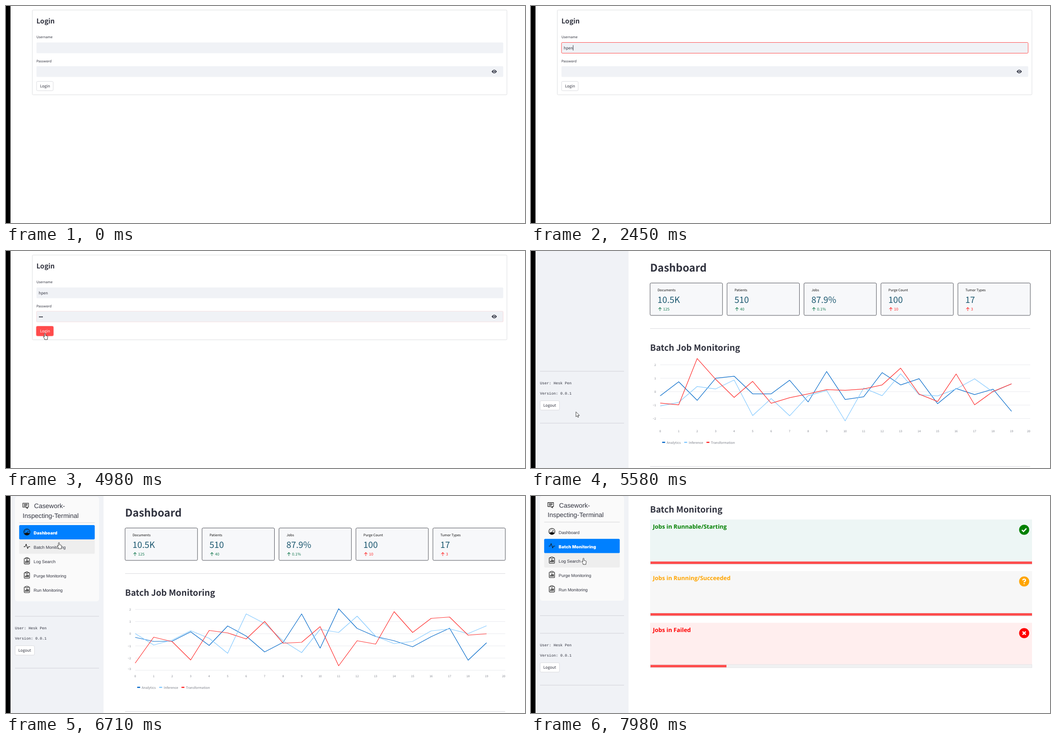
Recreate the animation shown at these times as an HTML page. Size 1155x485 px, loop 8 s.

```html
<!DOCTYPE html>
<html lang="en">
<head>
<meta charset="utf-8">
<title>Monitoring demo</title>
<style>
html, body { margin: 0; width: 100%; height: 100%; overflow: hidden; background: #fff; }
svg { display: block; width: 1155px; height: 485px; text-rendering: geometricPrecision; }
text { fill: #31333f; white-space: pre; font-family: "Noto Sans CJK JP", "Noto Sans CJK SC", "Noto Sans CJK", "Noto Sans", sans-serif; }
.b { font-weight: 700; }
.arial { font-family: "Liberation Sans", Arial, sans-serif; }
.black { font-family: Inter, "Liberation Sans", sans-serif; font-weight: 900; }
.mono { font-family: "Liberation Mono", monospace; }
.open { font-family: "Open Sans", "Noto Sans", sans-serif; font-weight: 700; }
.icon { fill: none; stroke: #111; stroke-width: 1.1; }
</style>
</head>
<body>
<svg id="stage" viewBox="0 0 1155 485"></svg>
<script>
const LOOP = 8000;
const USER = "hpen", FULL_NAME = "Hesk Pen";
const TITLE = ["Casework-", "Inspecting-Terminal"];
const BLUE = "#0068c9", SKY = "#83c9ff", RED = "#ff2b2b", CORAL = "#ff4b4b", GREEN = "#177a52";

const clamp = v => Math.max(0, Math.min(1, v));
const ramp = (t, a, b) => clamp((t - a) / (b - a));
const between = (t, a, b) => t >= a && t < b;

const text = (x, y, s, size, attrs = "") => `<text x="${x}" y="${y}" font-size="${size}" ${attrs}>${s}</text>`;
const rect = (x, y, w, h, fill, attrs = "") => `<rect x="${x}" y="${y}" width="${w}" height="${h}" fill="${fill}" ${attrs}/>`;
const line = (x1, x2, y, color, width = 1) => `<path d="M${x1} ${y}H${x2}" stroke="${color}" stroke-width="${width}"/>`;
const path = (d, attrs) => `<path d="${d}" ${attrs}/>`;
const at = (x, y, s, attrs = "") => `<g transform="translate(${x} ${y})" ${attrs}>${s}</g>`;

// Mouse: time, x, y
const TRACK = [
  [170, 797, 335], [560, 420, 62], [700, 260, 36], [920, 170, 95],
  [2980, 170, 95], [3450, 179, 141], [4510, 179, 141], [4850, 88, 191],
  [5080, 88, 191], [5310, 100, 358], [5580, 100, 360], [6040, 121, 133],
  [6300, 121, 133], [6600, 119, 111], [7250, 119, 111], [7450, 119, 120],
  [7710, 119, 120], [7980, 118, 146]
];
function mouseAt(t) {
  let i = 1;
  while (i < TRACK.length - 1 && t > TRACK[i][0]) i++;
  const [t0, x0, y0] = TRACK[i - 1], [t1, x1, y1] = TRACK[i];
  const k = ramp(t, t0, t1);
  return [x0 + (x1 - x0) * k, y0 + (y1 - y0) * k];
}
const POINTERS = {
  arrow: path("M0 0V11L2.6 8.6L4.3 12.4L6 11.6L4.4 8H7.8Z", 'fill="#fff" stroke="#111" stroke-width=".8"'),
  beam: path("M-2.5-5H-.6L0-4.4L.6-5H2.5M0-4.4V4.4M-2.5 5H-.6L0 4.4L.6 5H2.5", 'fill="none" stroke="currentColor" stroke-width=".9"'),
  hand: path("M-2.4-5.5Q-2.4-7-1.2-7T0-5.5V-2L3.8-1Q5.2-.6 5 1L4.2 5V7H-2.2V5.3L-4.8 1.2Q-5.2-.6-3.8-.3L-2.4 1Z", 'fill="#fff" stroke="#222" stroke-width=".9" stroke-linejoin="round"')
};
function pointer(t) {
  if (t < 170 || between(t, 1370, 2980) || between(t, 4120, 4510)) return "";
  const kind = t < 880 ? "arrow" : t < 4740 ? "beam" : t < 5080 ? "hand" : t < 5740 ? "arrow" : "hand";
  const color = between(t, 3400, 4120) ? "#e0656b" : "#333";
  return at(...mouseAt(t), POINTERS[kind], `color="${color}"`);
}

function field(x, y, focus, glow) {
  const w = 1106.5 - x;
  return rect(x, y, w, 24, "#f0f2f6", 'rx="2"') +
    rect(x + .2, y, w - .4, 24, "none", `rx="2" stroke="${CORAL}" stroke-width="${glow}" opacity="${focus}"`);
}
const caret = (x, y) => rect(x, y - 6, 1, 12, "#31333f");

function login(t, left) {
  const x = left + 9.5;
  const userFocus = ramp(t, 970, 1060) * (1 - ramp(t, 3380, 3500));
  const passFocus = ramp(t, 3380, 3560) * (1 - ramp(t, 4860, 5000));
  const typed = [1910, 2050, 2250, 2450].filter(k => t >= k).length;
  const dots = [4120, 4215, 4310].filter(k => t >= k).length;
  const hover = t >= 4770, pressed = t >= 4920;
  const caretX = 73 + [0, 5, 10.3, 15, 20.3][typed];
  let s = rect(left + .3, 9, 1114.5 - left, 189.5, "none", 'rx="2" stroke="#dcdde0"') +
    text(x, 38.6, "Login", 14.9, 'class="b"') +
    text(x, 72.2, "Username", 7.5) + field(x, 81.5, userFocus, 1) +
    text(x, 125.5, "Password", 7.5) + field(x, 134.5, passFocus, 1.2) +
    text(x + 5, 96.7, USER.slice(0, typed), 8.6);
  for (let i = 0; i < dots; i++) s += `<circle cx="${x + 7 + i * 3}" cy="147.3" r="1.3" fill="#31333f"/>`;
  if (between(t, 980, 1510) || between(t, 1910, 2980)) s += caret(caretX, 93.5);
  if (between(t, 3450, 3980) || between(t, 4120, 4840)) s += caret(73 + dots * 3.2, 146.5);
  s += at(1086.5, 146.5,
    path("M-5.8 0Q0-8 5.8 0Q0 8-5.8 0Z", 'fill="#262938"') +
    '<circle r="2.7" fill="#f0f2f6"/><circle r="1.6" fill="#262938"/>');
  if (pressed) s += rect(x - 1, 167.5, 39.5, 23, CORAL, 'rx="3" opacity=".5"');
  s += rect(x + .3, 168.5, 37, 20.8, pressed ? CORAL : "#fff", `rx="2.5" stroke="${hover ? CORAL : "#d9dade"}"`) +
    text(x + 8, 182, "Login", 8.6, pressed ? 'style="fill:#fff"' : hover ? `style="fill:${CORAL}"` : "");
  if (between(t, 600, 780))
    s += at(52, 32, path("M-1 2L-2.5 3.5A2.1 2.1 0 0 1-5.5.5L-3.5-1.5A2.1 2.1 0 0 1-.5-1.5M0-2L1.5-3.5A2.1 2.1 0 0 1 4.5-.5L2.5 1.5A2.1 2.1 0 0 1-.5 1.5", 'fill="none" stroke="#9a9ca5"'));
  return s;
}

const CLIP = '<rect x="-6" y="-5.3" width="12" height="12.6" rx="1.4"/><rect x="-2.6" y="-7" width="5.2" height="3" rx="1" fill="#fff"/>' +
  path("M-3 5V1.5M0 5V-1.5M3 5V-.3", 'stroke-width="1.9"');
const ICONS = {
  chat: path("M-6.3-6H6.3V3H2.5L4.5 6L-.5 3H-6.3Z", 'stroke-linejoin="round"') + path("M-4-3.6H4M-4-1.5H4M-4 .6H2", ""),
  gauge: '<circle r="6.9"/>' + path("M-5.7 3.8Q0 0 5.7 3.8Q0 9.8-5.7 3.8Z", 'fill="#111"') +
    path("M0 1L3.6-3M0-5.6V-3.8M-5.4-.4H-3.6M3.6-.4H5.4M-3.9-3.8L-2.8-2.7", ""),
  pulse: path("M-7 .8H-4L-1.7-5L1.7 5L3.6 .8H7", 'stroke-linejoin="round"'),
  clip: CLIP
};
const MENU = [["Dashboard", "gauge"], ["Batch Monitoring", "pulse"], ["Log Search", "clip"], ["Purge Monitoring", "clip"], ["Run Monitoring", "clip"]];

function menu(t) {
  const active = t < 7100 ? 0 : 1;
  const hovered = Math.floor((mouseAt(t - 100)[1] - 66) / 32);
  let s = rect(20, 1.5, 187, 233.8, "#fafafa", 'rx="5"') +
    at(43.8, 22, ICONS.chat, 'class="icon"') +
    text(62.5, 27, TITLE[0], 14.4, 'class="arial"') + text(37, 48.7, TITLE[1], 14.4, 'class="arial"') +
    line(29.5, 197.5, 59.7, "#d4d5d8");
  MENU.forEach(([label, icon], i) => {
    const y = 82.5 + i * 32.05, on = i === active;
    if (on) s += rect(29.3, y - 17.4, 168.2, 32, "#0080ff", 'rx="2.5"');
    else if (i === hovered) s += rect(29.3, y - 17.4, 168.2, 32, "#eee", 'rx="2.5"');
    s += at(46.5, y - 2, ICONS[icon], 'class="icon"') +
      text(61.6, y + 3.6, label, on ? 9.6 : 9.5, on ? 'class="black" style="fill:#fff"' : 'class="arial"');
  });
  return s;
}

function sidebar(t) {
  const batch = t >= 7310, dy = batch ? 38 : 0, up = batch ? -1.4 : 0;
  let s = rect(10, 0, 207, 485, "#f0f2f6");
  if (t >= 5700) s += at(0, up, menu(t));
  if (t >= 5580) {
    s += line(20, 207, 268.8 + up, "#cfd1d7") + (batch ? line(20, 207, 306.8, "#cfd1d7") : "") +
      at(0, dy, text(20, 298.3, "User: " + FULL_NAME, 8.4, 'class="mono"') +
        text(20, 321.2, "Version: 0.0.1", 8.4, 'class="mono"') +
        rect(20.3, 334.6, 43, 21, "#fff", 'rx="2.5" stroke="#d9dade"') +
        text(27.5, 348.3, "Logout", 8.6) + line(20, 207, 384.8, "#cfd1d7"));
  }
  return s;
}

const CHARTS = [
  { zero: 314.3, unit: 30, low: -2, drop: 72.2, series: [
    [BLUE, [396, 364.5, 406, 356.5, 352, 391.5, 391.5, 361, 409.5, 341.5, 404, 398, 344, 371.5, 357.5, 413.5, 379.5, 393, 381, 430.5]],
    [SKY, [418.5, 410.5, 375, 380.5, 360.5, 440, 402, 440.5, 395.5, 384, 452, 378.5, 395.5, 346.5, 393.5, 396, 380.5, 358, 387.5, 369]],
    [RED, [412, 416, 312.5, 359, 399.5, 363.5, 412.5, 400, 391.5, 382, 383.5, 380.5, 371.5, 334, 392, 408.5, 347, 416, 386, 369]]] },
  { zero: 307.8, unit: 27.2, low: -3, drop: 0, series: [
    [BLUE, [316, 325, 324.5, 303.5, 334, 290.5, 313, 348.5, 327, 263.5, 340, 252, 296, 314, 323.5, 337, 314.5, 295.5, 367, 328]],
    [SKY, [307.5, 333, 322, 301, 318, 351.5, 263.5, 285, 324, 350, 298, 305, 268.5, 313.5, 330, 325, 301.5, 297, 307.5, 290]],
    [RED, [373.5, 315.5, 325.5, 366.5, 300.5, 306, 319.5, 280.5, 329, 327, 292, 379.5, 323.5, 331, 258.5, 305, 273.5, 270.5, 311, 308]]] }
];
function chart({ zero, unit, low, drop, series }) {
  const px = i => 287.5 + i * 41.16, gray = 'style="fill:#7d808a"';
  let s = "";
  for (let v = 2; v >= low; v--) {
    const y = zero - v * unit;
    s += line(287.5, 1111, y, "#e8e9ee") +
      text(278, Math.min(y + 2.5, 388.6), v < 0 ? "−" + -v : v, 6.4, `text-anchor="end" ${gray}`);
  }
  for (let i = 0; i <= 20; i++)
    s += text(i < 20 ? px(i) : 1111, 404.6, i, 6.4, `text-anchor="${i < 20 ? "middle" : "end"}" ${gray}`);
  for (const [color, ys] of series)
    s += path("M" + ys.map((y, i) => `${px(i).toFixed(1)} ${(y - drop).toFixed(1)}`).join("L"),
      `fill="none" stroke="${color}" stroke-width="1.25" stroke-linejoin="round"`);
  [["Analytics", BLUE, 292], ["Inference", SKY, 341], ["Transformation", RED, 390.5]].forEach(([label, color, x]) => {
    s += rect(x, 426.4, 6.5, 2.6, color) + text(x + 10, 430.5, label, 7.4, gray);
  });
  return s;
}

const METRICS = [["Documents", "10.5K", "125"], ["Patients", "510", "40"], ["Jobs", "87.9%", "0.1%"], ["Purge Count", "100", "10"], ["Tumor Types", "17", "3"]];
function dashboard(t) {
  const doubled = between(t, 5850, 6500);
  const heading = text(265, 45.6, "Dashboard", 23.5, 'class="b"');
  let s = heading;
  METRICS.forEach(([label, value, delta], i) => {
    const x = 265 + i * 171.25, color = i < 3 ? GREEN : RED;
    s += rect(x, 71.5, 161.2, 72.4, "#f7f8fa", 'rx="2.5" stroke="#4b4d55"') +
      text(x + 16.7, 90.2, label, 7.5, 'style="fill:#111"') +
      text(x + 16.5, 115.7, value, 19.3, 'style="fill:#1c5870"') +
      path(`M${x + 22} 134V126.5M${x + 18.6} 129.8L${x + 22} 126.4L${x + 25.4} 129.8`, `fill="none" stroke="${color}" stroke-width="1.1"`) +
      text(x + 29, 133.3, delta, 8.6, `style="fill:${color}"`);
  });
  s += line(265, 1111, 173.3, "#d6d7db") + text(265, 223, "Batch Job Monitoring", 19, 'class="b"') +
    chart(CHARTS[t < 6500 ? 0 : 1]) + line(265, 1111, 481.6, "#d6d7db");
  return doubled ? heading + at(0, 72.4, s) : s;
}

const PANELS = [
  ["Runnable/Starting", "green", "#edf6f5", 849, "M-5 .3L-1.5 3.8L5-3"],
  ["Running/Succeeded", "orange", "#f7f7f7", 849, "M-3-2.5Q-2.8-5.3 0-5.3T3-2.6Q3-.9 .9 0Q0 .5 0 2M0 4V6"],
  ["Failed", "red", "#ffeeee", 169, "M-3.5-3.5L3.5 3.5M3.5-3.5L-3.5 3.5"]
];
function batchPage() {
  let s = text(265, 37.3, "Batch Monitoring", 19, 'class="b"');
  PANELS.forEach(([label, color, fill, width, mark], i) => {
    s += at(0, i * 115.5,
      rect(265, 52.5, 850, 100, fill) +
      rect(265.4, 145.8, 849.4, 7, "#f0f1f2", 'stroke="#dfe1e4" stroke-width=".8"') +
      rect(266, 146.5, width, 5.4, CORAL) +
      text(271.3, 72.8, "Jobs in " + label, 12.9, `class="open" style="fill:${color}"`) +
      at(1097.5, 75.5, `<circle r="11.2" fill="${color}"/>` + path(mark, 'fill="none" stroke="#fff" stroke-width="2.6"')));
  });
  return s;
}

function scene(t) {
  let s = rect(0, 0, 10, 485, "#000");
  if (t < 5240) s += login(t, 58.2);
  else s += sidebar(t) + (t < 5380 ? login(t, 265) : t < 7310 ? dashboard(t) : batchPage());
  return s + pointer(t);
}

const stage = document.getElementById("stage");
let shown = "";
function frame() {
  const next = scene(performance.now() % LOOP);
  if (next !== shown) stage.innerHTML = shown = next;
  requestAnimationFrame(frame);
}
frame();
</script>
</body>
</html>
```
